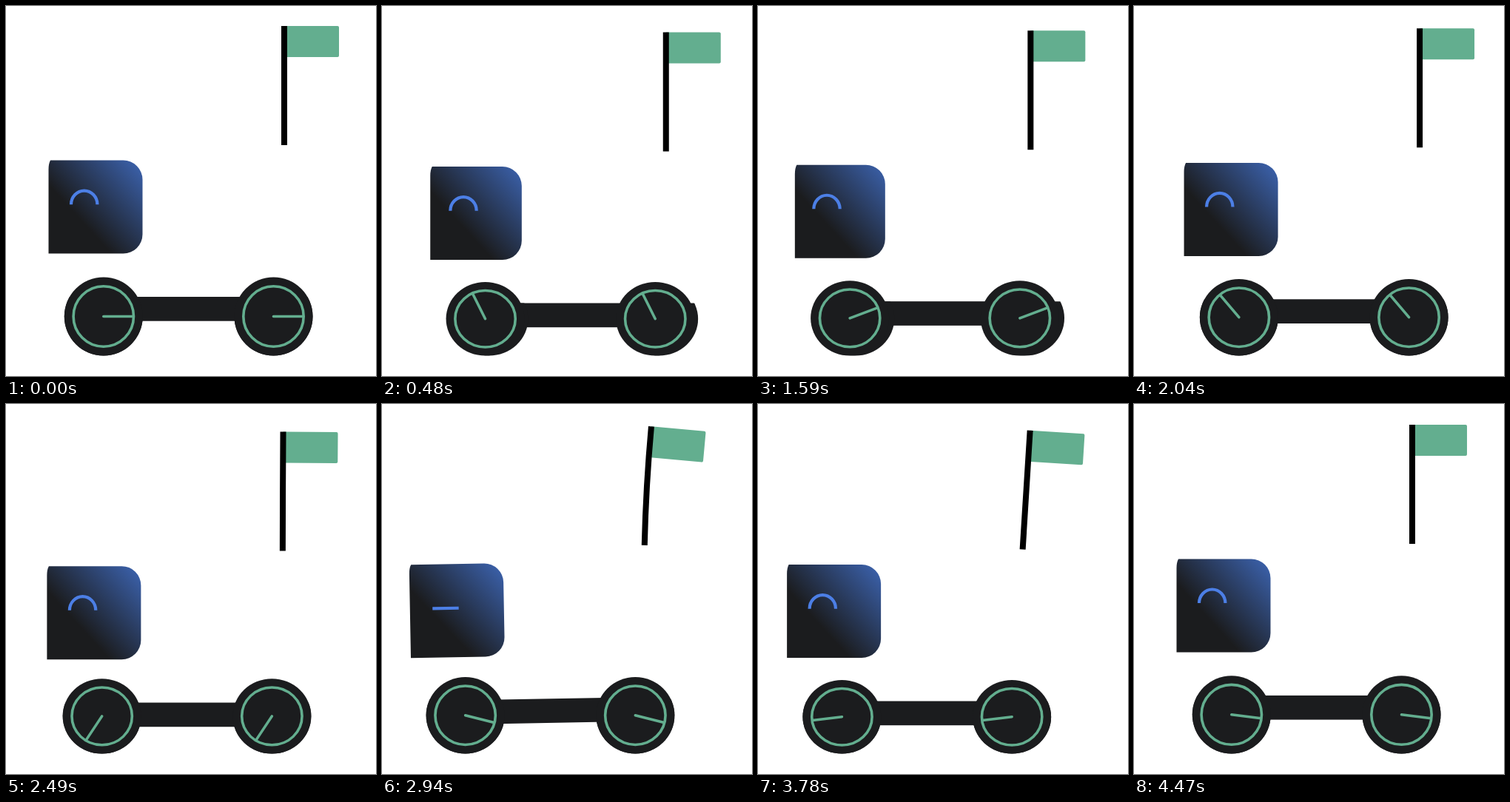
Write an HTML page that moves like this. It is 500 px wide and 500 px high and loops after 4500 ms.

```html
<!DOCTYPE html>
<html lang="en">
<head>
<meta charset="utf-8">
<title>Rolling cart</title>
<style>
  html, body { margin: 0; width: 100%; height: 100%; overflow: hidden; background: #fff; }
  svg { display: block; width: 100%; height: 100%; }
  .dark { fill: #1b1c1e; }
  .green { fill: #63ae8f; }
  .line { fill: none; stroke: #63ae8f; stroke-width: 3.6; stroke-linecap: round; }
</style>
</head>
<body>
<svg viewBox="0 0 500 500">
  <defs>
    <linearGradient id="paint" gradientUnits="userSpaceOnUse" x1="100" y1="288" x2="179" y2="216">
      <stop offset="0" stop-color="#1b1c1e"/>
      <stop offset="1" stop-color="#3a5fa7"/>
    </linearGradient>
    <clipPath id="below"><rect id="deck" width="500" height="500"/></clipPath>
    <g id="tires" class="dark">
      <circle cx="131.8" cy="419.5" r="53"/>
      <circle cx="361.5" cy="419.5" r="53"/>
    </g>
    <g id="rim" class="line">
      <circle r="40.7"/>
      <path id="spoke" d="M0 0H40"/>
    </g>
  </defs>
  <g id="frame">
    <path id="flag" class="green" d="M0 0H72a2 2 0 0 1 2 2V40a2 2 0 0 1-2 2H0z"/>
    <path id="pole" fill="none" stroke="#000" stroke-width="8"/>
    <rect class="dark" x="131" y="393" width="230" height="32.7"/>
    <path id="body" fill="url(#paint)"/>
    <path id="eye" fill="none" stroke="#4c7fe6" stroke-width="4.2"/>
  </g>
  <g clip-path="url(#below)"><use id="skirt" href="#tires"/></g>
  <g id="wheels">
    <use href="#tires"/>
    <use href="#rim" x="131.8" y="419.5"/>
    <use href="#rim" x="361.5" y="419.5"/>
  </g>
</svg>
<script>
const LOOP = 4500, STEP = 30, BOUNCE = 300, TURN = 1500;
const SWAY = 1260, SWAY_END = 1.5 * SWAY;
const { PI, sin, cos, min, max } = Math;
const set = (id, name, value) => document.getElementById(id).setAttribute(name, value);
const move = (id, value) => set(id, 'transform', value);

const clamp = u => min(1, max(0, u));
const ease = u => (1 - cos(PI * clamp(u))) / 2;
const hump = (t, from, to) => sin(PI * clamp((t - from) / (to - from))) ** 2;

// Turning points of the drive: [time, x]
const turns = [[0, 0], [150, -14], [390, 10], [840, -13.6], [1290, 0],
  [1530, -9], [SWAY_END, 11], [3390, -27], [4410, 0], [LOOP, 0]];

function drive(t) {
  const i = turns.findIndex(p => p[0] > t);
  const [t0, x0] = turns[i - 1], [t1, x1] = turns[i];
  return x0 + (x1 - x0) * ease((t - t0) / (t1 - t0));
}

function drawFlag(t) {
  const root = 4.6 * hump(t, 2400, LOOP), tip = root + 3.9 * hump(t, 2400, 3400);
  const up = (x, y, deg) => [x + 80.5 * sin(deg * PI / 180), y - 80.5 * cos(deg * PI / 180)];
  const mid = up(376, 188, root), top = up(...mid, tip);
  set('pole', 'd', `M376 188Q${mid} ${top}`);
  move('flag', `translate(${top}) rotate(${tip})`);
}

function drawBody(t, lag) {
  const shift = -0.7 * max(0, lag), left = 57.5 + min(0, lag), right = 184.5 + shift;
  set('body', 'd', `M${left + 2.5} 208.6H${right - 26}a26 26 0 0 1 26 26v74a26 26 0 0 1-26 26H${left}V221q0-8 2.5-12.4z`);
  const shut = ease((t - 2700) / 120) - ease((t - 3180) / 120);
  set('eye', 'd', `M88 268.2A17.7 ${18.6 * (1 - shut)} 0 0 1 123.4 268.2`);
  move('eye', `translate(${shift})`);
}

function draw(t) {
  const x = drive(t), bounce = ease(2 * (t % BOUNCE) / BOUNCE) - ease(2 * (t % BOUNCE) / BOUNCE - 1);
  const lag = t < SWAY_END ? 7.2 * sin(2 * PI * t / SWAY) : 0;
  const drop = 9.4 * bounce + 4.9 * hump(t, 2000, 3240);
  const squash = 1 - 0.068 * bounce;
  const press = dx => `translate(${dx} ${472.5 * (1 - squash)}) scale(1 ${squash})`;
  move('frame', `translate(${x} ${drop}) rotate(${-1.05 * hump(t, 2520, 3360)} 230 300)`);
  move('wheels', press(x));
  move('skirt', press(x + lag));
  set('deck', 'y', 393 + drop);
  move('spoke', `rotate(${-360 * t / TURN})`);
  drawFlag(t);
  drawBody(t, lag);
}

const start = performance.now();
function tick() {
  const t = (performance.now() - start) % LOOP;
  draw(Math.floor(t / STEP) * STEP);
  requestAnimationFrame(tick);
}
tick();
</script>
</body>
</html>
```
